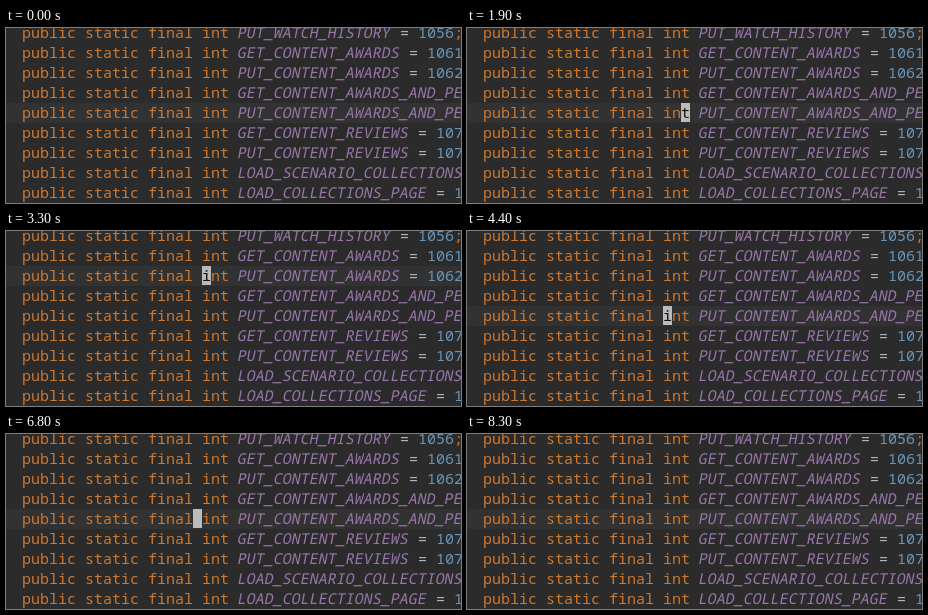
An HTML page for the animation above (8.4 s loop, 455 px wide and 175 px high).

```html
<!DOCTYPE html>
<html lang="en">
<head>
<meta charset="utf-8">
<title>Caret moves</title>
<style>
  html, body { margin: 0; width: 100%; height: 100%; overflow: hidden; background: #2b2b2b; }
  svg { display: block; width: 455px; height: 175px; }
  text { font: 15px "Noto Sans Mono", monospace; white-space: pre; fill: #a9b7c6; }
  .key { fill: #cc7832; }
  .name { fill: #9876aa; }
  .num { fill: #6897bb; }
  .name, .slant { transform: skewX(-11deg); transform-box: fill-box; transform-origin: center; }
  #glyph { fill: #111111; }
</style>
</head>
<body>
<svg viewBox="0 0 455 175">
  <rect width="455" height="175" fill="#2b2b2b"/>
  <rect id="line" width="455" height="20" fill="#323232"/>
  <g id="code"></g>
  <g id="caret">
    <rect width="9" height="19" fill="#bbbbbb"/>
    <text id="glyph" y="15"></text>
  </g>
</svg>
<script>
const LOOP = 8400, TICK = 100, LEFT = 16, TOP = -5, CELL = 9, ROW = 20;
const FADE_START = 7600, FADE_STEPS = 8;
const PREFIX = 'public static final int ';
const LAST_COL = Math.floor((455 - LEFT) / CELL);

const lines = `PUT_WATCH_HISTORY = 1056;
GET_CONTENT_AWARDS = 1061
PUT_CONTENT_AWARDS = 1062
GET_CONTENT_AWARDS_AND_PE
PUT_CONTENT_AWARDS_AND_PE
GET_CONTENT_REVIEWS = 107
PUT_CONTENT_REVIEWS = 107
LOAD_SCENARIO_COLLECTIONS
LOAD_COLLECTIONS_PAGE = 1`.split('\n').map(s => PREFIX + s);

const moves = {
  i: p => { p.on = true; },
  h: p => { p.col--; },
  l: p => { p.col++; },
  k: p => { p.row--; },
  j: p => { p.row++; },
  e: p => { p.col = LAST_COL; },
  b: p => { p.col = lines[p.row].lastIndexOf(' ', p.col); }
};

// Keys pressed at an even pace between two times
const runs = [
  { keys: 'illll', from: 400, to: 1300 },
  { keys: 'e', from: 1400, to: 1400 },
  { keys: 'bhhh', from: 1800, to: 2200 },
  { keys: 'kkk', from: 2700, to: 3000 },
  { keys: 'jjj', from: 3300, to: 3700 },
  { keys: 'hlkhj', from: 4100, to: 5300 },
  { keys: 'kljh', from: 5800, to: 6800 }
];

const presses = runs.flatMap(({ keys, from, to }) => [...keys].map((key, i) => {
  const at = from + (to - from) * i / Math.max(1, keys.length - 1);
  return { key, at: Math.round(at / TICK) * TICK };
}));

const el = id => document.getElementById(id);
const line = el('line'), caret = el('caret'), glyph = el('glyph');
const colX = col => LEFT + col * CELL;
const rowY = row => TOP + row * ROW;

function kind(token) {
  if (/[A-Z]/.test(token)) return 'name';
  if (/\d/.test(token)) return 'num';
  return token === '=' ? 'sign' : 'key';
}

function addText(str, col, row) {
  const t = document.createElementNS('http://www.w3.org/2000/svg', 'text');
  t.setAttribute('x', colX(col));
  t.setAttribute('y', rowY(row) + 15);
  t.setAttribute('class', kind(str));
  t.textContent = str;
  el('code').append(t);
}

lines.forEach((text, row) => {
  for (const m of text.matchAll(/[a-z]+|[A-Z_]+|\d+|[=;]/g)) addText(m[0], m.index, row);
});

function draw(t) {
  const p = { col: PREFIX.indexOf('int'), row: 4, on: false };
  for (const { key, at } of presses) if (t >= at) moves[key](p);

  const faded = Math.floor((t - FADE_START) / TICK) + 1;
  const alpha = 1 - Math.min(1, Math.max(0, faded / FADE_STEPS));

  line.setAttribute('y', rowY(p.row));
  caret.setAttribute('transform', `translate(${colX(p.col)} ${rowY(p.row)})`);
  caret.setAttribute('opacity', p.on ? alpha : 0);
  glyph.textContent = lines[p.row][p.col];
  glyph.setAttribute('class', p.col < PREFIX.length ? '' : 'slant');
}

const start = performance.now();
function frame() {
  draw((performance.now() - start) % LOOP);
  requestAnimationFrame(frame);
}
frame();
</script>
</body>
</html>
```
